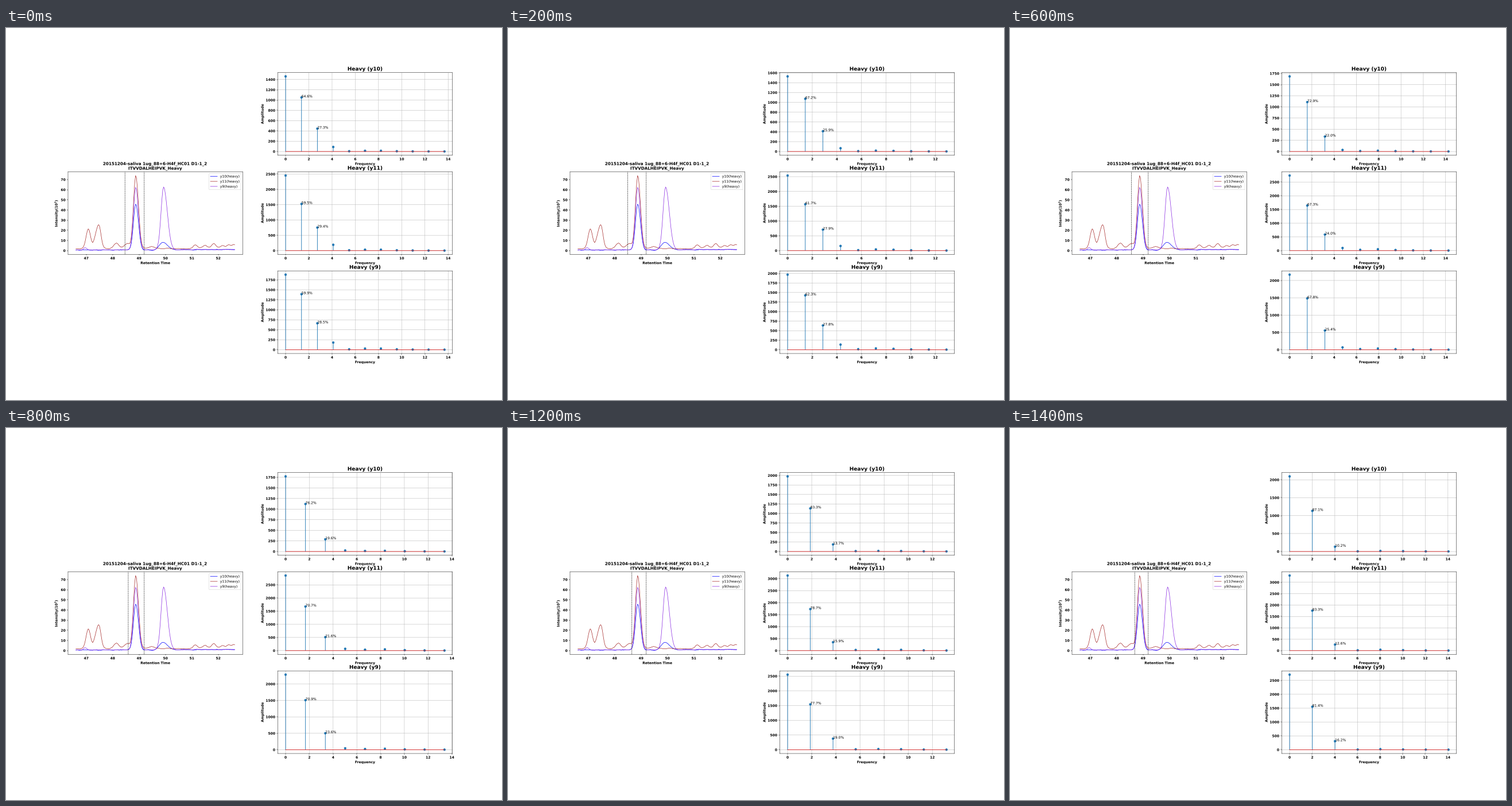
These frames come from a looping animation (864 by 648 pixels, 1.6 s). A matplotlib script:

```python
import numpy as np
import matplotlib.pyplot as plt
from matplotlib.animation import FuncAnimation
from matplotlib.patheffects import Normal

FRAMES = 8
SAMPLE_RATE = 30.1
FIRST_WINDOW = 22  # samples between the dashed lines at the start

plt.rcParams.update({
    "font.family": "DejaVu Sans",
    "font.size": 10,
    "font.weight": "bold",
    "axes.labelweight": "bold",
    "axes.titleweight": "bold",
    # Outlined text and unsnapped lines keep sub-pixel positions.
    "text.hinting": "none",
    "path.snap": False,
    "path.effects": [Normal()],
})

# Each entry holds the coefficients of a + b*step + c*step**2:
# summed signal, first harmonic over DC, percentages of harmonics 1 and 2.
IONS = {
    "y10": dict(total=(32130, 0, -14.5), first=(0.7195, -0.0168, -0.00125),
                share1=(64.6, 2.45, 0.11), share2=(27.3, -1.25, -0.17)),
    "y11": dict(total=(53966, -643, 0), first=(0.6215, -0.003, -0.0014),
                share1=(59.5, 2.0, 0.2), share2=(29.4, -1.35, -0.15)),
    "y9": dict(total=(41360, 0, -15), first=(0.740, -0.0148, -0.0013),
               share1=(59.9, 2.3, 0.11), share2=(28.5, -0.5, -0.18)),
}


def spectrum(ion, step):
    """Frequencies, amplitudes and the two labelled percentages."""
    size = FIRST_WINDOW - step
    index = np.arange(round(size / 2))
    total, first, share1, share2 = (
        np.polynomial.polynomial.polyval(step, ion[key])
        for key in ("total", "first", "share1", "share2"))

    amps = np.zeros(index.size)
    amps[0] = total / size
    amps[1] = amps[0] * first
    amps[2] = amps[1] * share2 / share1
    rest = amps[1] * (100 - share1 - share2) / share1
    amps[3] = rest * (0.67 - 0.073 * step)
    weights = 1 / (1 + (index[4:] - 5.5 + 0.2 * step) ** 2)
    amps[4:] = (rest - amps[3]) * weights / weights.sum()
    return index * SAMPLE_RATE / size, amps, (share1, share2)


def bump(x, center, height, left, right=None):
    width = np.where(x < center, left, right or left)
    return height * np.exp(-0.5 * ((x - center) / width) ** 2)


def main_peak(x, height):
    return bump(x, 48.876, height, 0.087, 0.1)


def ripple(rng, x, scale):
    noise = rng.normal(0, scale, x.size + 4)
    return np.convolve(noise, np.ones(5), "valid") / 3.6


def traces():
    rng = np.random.default_rng(4)
    x = 46.61 + np.arange(182) / SAMPLE_RATE
    late = np.clip((x - 50.8) / 0.6, 0, 1)

    y10 = (0.6 + 0.4 * late + ripple(rng, x, 0.3) + main_peak(x, 45.4)
           + bump(x, 49.9, 7.4, 0.13, 0.18))

    y11 = (1.9 + late + ripple(rng, x, 0.3) + main_peak(x, 72)
           + bump(x, 47.08, 19.5, 0.085)
           + bump(x, 47.36, 11, 0.075) + bump(x, 47.49, 20.5, 0.075)
           + bump(x, 48.14, 5.4, 0.1) + bump(x, 48.57, 5, 0.12, 0.07)
           + bump(x, 49.47, 2, 0.12))
    for center in (51.13, 51.5, 51.83, 52.17, 52.4, 52.6):
        y11 += bump(x, center, rng.uniform(2, 4), 0.07)

    y9 = (0.8 + 0.3 * late + ripple(rng, x, 0.3) + main_peak(x, 62)
          + bump(x, 46.95, 2.3, 0.06) + bump(x, 49.93, 62, 0.095, 0.14))
    return x, {"y10": (y10, "blue"), "y11": (y11, "brown"), "y9": (y9, "blueviolet")}


fig = plt.figure(figsize=(20, 15), dpi=43.2, facecolor="white")
fig.subplots_adjust(left=0.125, right=0.9, bottom=0.125, top=0.88,
                    wspace=0.2, hspace=0.2)

chroma = fig.add_subplot(3, 2, 3)
times, curves = traces()
for name, (values, color) in curves.items():
    chroma.plot(times, np.maximum(values, 0), color=color, lw=1.2,
                label=f"{name}(heavy)")
window_start = chroma.axvline(48.466, color="k", ls="--", lw=1)
chroma.axvline(49.197, color="k", ls="--", lw=1)
chroma.set(xlim=(46.309, 52.928), ylim=(-3.7, 77.7),
           xlabel="Retention Time", ylabel="Intensity($10^2$)")
chroma.set_title("20151204-saliva 1ug_88+6-H4f_HC01 D1-1_2\nITVVDALHEIPVK_Heavy",
                 fontsize=12)
chroma.legend(loc="upper right", prop={"weight": "normal", "size": 10})

panels = {name: fig.add_subplot(3, 2, 2 * row + 2) for row, name in enumerate(IONS)}


def draw_spectrum(ax, name, step):
    freqs, amps, shares = spectrum(IONS[name], step)
    ax.clear()
    ax.stem(freqs, amps)
    for freq, amp, share in zip(freqs[1:], amps[1:], shares):
        ax.text(freq, amp, f"{share:.1f}%", weight="normal")
    ax.grid(True)
    ax.set(xlabel="Frequency", ylabel="Amplitude")
    ax.set_title(f"Heavy ({name})", fontsize=15)


def update(step):
    window_start.set_xdata([48.466 + 0.0312 * step] * 2)
    for name, ax in panels.items():
        draw_spectrum(ax, name, step)


anim = FuncAnimation(fig, update, frames=FRAMES, interval=200, repeat=True,
                     repeat_delay=0, blit=False)
plt.show()
```
